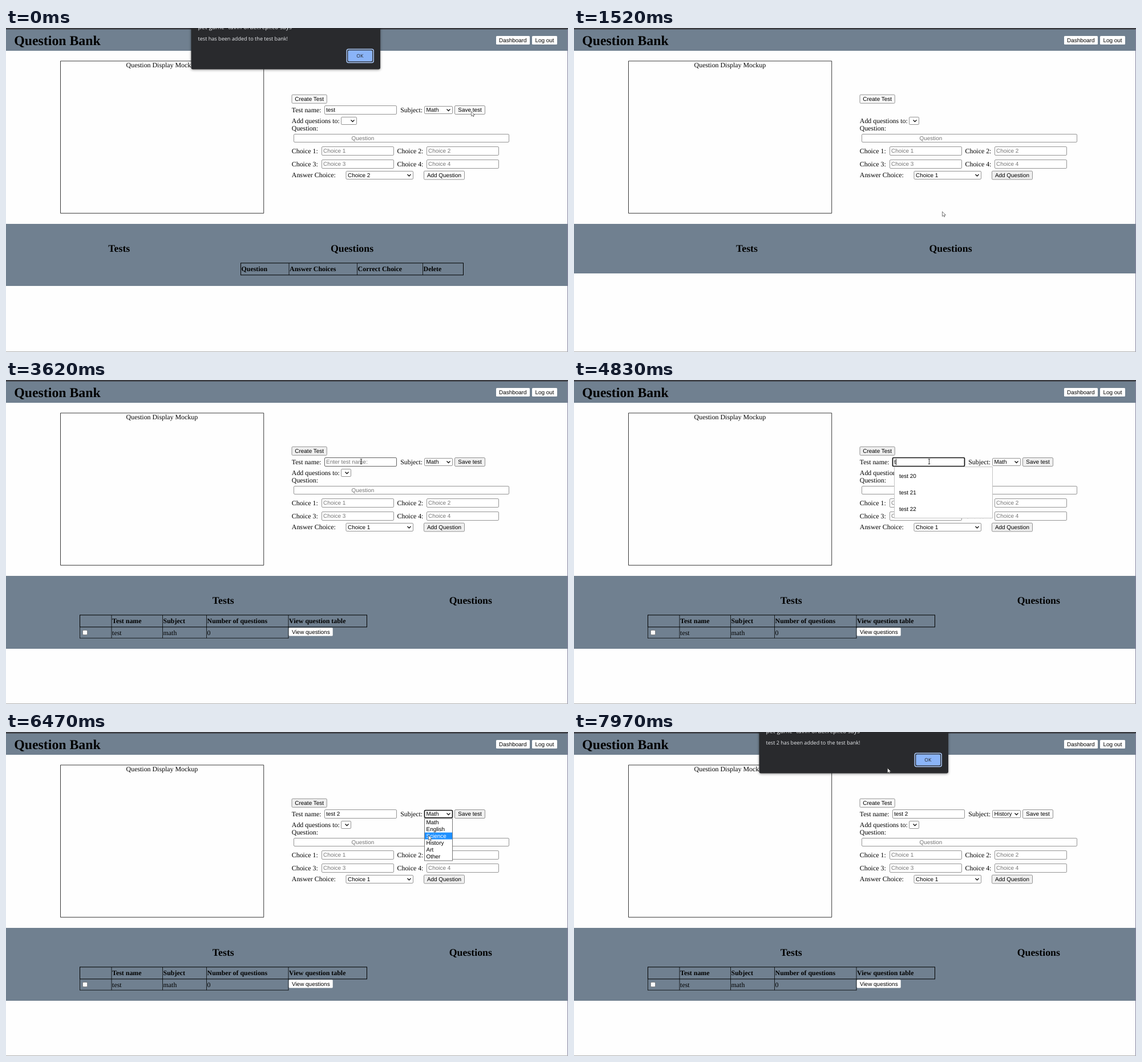
An HTML page that plays this animation: 985x569 px, repeating every 8000 ms.

```html
<!DOCTYPE html>
<html lang="en">
<head>
<meta charset="utf-8">
<title>Question Bank</title>
<style>
  html, body { margin: 0; width: 100%; height: 100%; overflow: hidden; background: #fefefe; }
  svg { display: block; width: 985px; height: 569px; }
  text {
    white-space: pre; text-rendering: geometricPrecision;
    font: 11.9px "Liberation Serif", "Times New Roman", serif;
  }
  .bold { font-weight: bold; }
  .h1 { font-size: 23.8px; font-weight: bold; }
  .h2 { font-size: 17.8px; font-weight: bold; }
  .ui { font: 9.95px "Liberation Sans", Arial, sans-serif; }
  .hint { fill: #757575; }
  .mid { text-anchor: middle; }
  .msg { font: 9.1px "Open Sans", "Noto Sans", sans-serif; fill: #e8eaed; }
  .msgTitle { font-size: 10.4px; }
  .ok { font-size: 8.6px; fill: #202124; }
  .dialog { filter: drop-shadow(0 1px 2px rgba(0, 0, 0, .45)); }
</style>
</head>
<body>
<svg id="stage" viewBox="0 0 985 569" xmlns="http://www.w3.org/2000/svg"></svg>
<script>
const LOOP = 8000;
const AT = {
  closeStart: 900, closeEnd: 1095, reload: 1250, loaded: 1700, repaint: 2700,
  create: 3150, focus: 3790, typing: 4770, suggestEnd: 5640,
  openList: 6110, pick: 7040, press: 7420, alert: 7570
};
const NEW_NAME = 'test 2';
const SUBJECTS = ['Math', 'English', 'Science', 'History', 'Art', 'Other'];
const SUGGESTIONS = ['test 20', 'test 21', 'test 22', 'quiz', 'sample'];
const HAIR = .78;

// time, x, y of the pointer tip
const PATH = [
  [0, 815, 146], [150, 815, 146], [590, 628, 53], [740, 628, 53], [860, 621, 54],
  [1090, 621, 54], [1520, 645, 322], [1580, 645, 322], [1960, 662, 380], [2390, 640, 309],
  [2980, 530, 122], [3150, 530, 122], [3600, 622, 143], [5630, 622, 143], [5860, 734, 146],
  [6110, 738, 147], [6410, 739, 178], [6470, 740, 181], [6720, 740, 181], [6860, 741, 191],
  [7040, 741, 191], [7220, 806, 147], [7570, 806, 147], [7960, 549, 63], [LOOP, 549, 63]
];

const stage = document.getElementById('stage');
const meter = document.createElement('canvas').getContext('2d');
meter.font = '9.95px "Liberation Sans", Arial, sans-serif';

const within = (t, from, to) => t >= from && t < to;
const clamp = v => Math.max(0, Math.min(1, v));
const rect = (x, y, w, h, fill, extra = '') =>
  `<rect x="${x}" y="${y}" width="${w}" height="${h}" fill="${fill}" ${extra}/>`;
const text = (x, y, s, cls = '') => `<text x="${x}" y="${y}" class="${cls}">${s}</text>`;
const line = d => `<path d="${d}" fill="none" stroke="#000" stroke-width="${HAIR}"/>`;
const box = (x, y, w, h, fill = '#fff', stroke = '#767676', width = HAIR) =>
  rect(x + .5, y + .5, w - 1, h - 1, fill, `rx="1.6" stroke="${stroke}" stroke-width="${width}"`);

function pointerAt(t) {
  const i = Math.max(1, PATH.findIndex(p => p[0] > t));
  const [t0, x0, y0] = PATH[i - 1], [t1, x1, y1] = PATH[i];
  const u = clamp((t - t0) / (t1 - t0)), k = u * u * (3 - 2 * u);
  return { x: x0 + (x1 - x0) * k, y: y0 + (y1 - y0) * k };
}

const inside = (p, x, y, w, h) => p.x >= x && p.x <= x + w && p.y >= y && p.y <= y + h;

function button(x, y, w, h, label, fill) {
  return box(x, y, w, h, fill) + text(x + w / 2, y + h / 2 + 3.4, label, 'ui mid');
}

function select(x, y, w, h, label, focused) {
  const cx = x + w - 7.5, cy = y + h / 2;
  return box(x, y, w, h, '#fff', focused ? '#101010' : '#767676', focused ? 1.6 : HAIR) +
    text(x + 3.5, cy + 3.4, label, 'ui') +
    `<path d="M${cx - 3} ${cy - 1.5}l3 3l3-3" fill="none" stroke="#111" stroke-width="1.3"/>`;
}

function pageFrame() {
  return rect(0, 0, 985, 569, '#fefefe') + rect(0, 0, 984, 40, '#708090') +
    rect(0, 0, 985, 2.5, '#393a40') + text(14.3, 30, 'Question Bank', 'h1') +
    rect(859, 14, 59, 15, '#fff', 'rx="1.5"') + text(888.3, 25, 'Dashboard', 'ui mid') +
    rect(922, 14, 44, 15, '#fff', 'rx="1.5"') + text(944, 25, 'Log out', 'ui mid') +
    line('M95.5 58H451.7V325.3H95.5Z') + text(210.6, 69, 'Question Display Mockup');
}

function form(t, p, blocked) {
  const old = t < AT.reload;
  const listOpen = within(t, AT.openList, AT.pick);
  const free = !blocked && !listOpen;
  const plain = old ? '#fbfbfb' : '#efefef';
  const quiet = t < AT.repaint || t >= AT.alert ? '#f8f8f8' : plain;
  const tone = (fill, ...area) => free && !old && inside(p, ...area) ? '#e5e5e5' : fill;
  let beam = false;

  const input = (x, y, w, h, value, hint, tx = x + 3, focused = false) => {
    const over = free && inside(p, x, y, w, h);
    beam = beam || over;
    return box(x, y, w, h, '#fff', focused ? '#101010' : over ? '#333' : '#767676', focused ? 1.7 : HAIR) +
      text(tx, y + h / 2 + 3.4, value || hint, value ? 'ui' : 'ui hint');
  };

  let out = button(500.5, 116.7, 62.3, 16, 'Create Test', tone(quiet, 501, 117, 62, 16));

  if (old || t >= AT.create) {
    const count = t < AT.typing ? 0 : Math.floor((t - AT.typing) / 92) + 1;
    const value = old ? 'test' : NEW_NAME.slice(0, count);
    const focused = within(t, AT.focus, AT.openList);
    const saveFill = within(t, AT.press, AT.alert) ? '#f5f5f5' : tone(quiet, 786, 136, 54, 16);
    out += text(500.8, 148, 'Test name:') +
      input(558, 136, 127, 16, value, 'Enter test name:', 561, focused) +
      text(691.2, 148, 'Subject:') +
      select(733, 137, 50, 14, !old && t >= AT.pick ? 'History' : 'Math', within(t, AT.openList, AT.press)) +
      button(786, 136, 54, 16, 'Save test', saveFill);
    if (within(t, AT.focus, 4330) || within(t, AT.typing, 5730)) {
      out += rect(561.3 + meter.measureText(value).width, 138.5, .9, 11, '#000');
    }
  }

  out += text(500.8, 166.5, 'Add questions to:') +
    (t < AT.closeStart ? select(587, 156, 28, 14, '')
      : old ? select(587, 156, 34, 14, 'test') : select(587, 156, 18, 14, '')) +
    text(500.8, 179.8, 'Question:') + input(504, 186, 378, 15, '', 'Question', 605.5);

  for (let i = 0; i < 4; i++) {
    const right = i % 2, y = i < 2 ? 208 : 231;
    out += text(right ? 685.5 : 500.8, y + 11.5, `Choice ${i + 1}:`) +
      input(right ? 737 : 553, y, 127, 16, '', `Choice ${i + 1}`);
  }

  out += text(500.8, 261.5, 'Answer Choice:') +
    select(595.5, 251, 118.5, 15, old ? 'Choice 2' : 'Choice 1') +
    button(732, 250.7, 72, 15.8, 'Add Question', tone(plain, 732, 251, 72, 15));

  return { out, beam };
}

function headerRow(cols, labels) {
  const [first, last] = [cols[0], cols[cols.length - 1]];
  return rect(first + .5, 412.8, last - first, 21, 'none', 'stroke="#000"') +
    line(cols.slice(1, -1).map(x => `M${x + .5} 413V434`).join('')) +
    labels.map((s, i) => text(cols[i] + 1.6, 427, s, 'bold')).join('');
}

function questionsTable(x) {
  return headerRow([0, 84.5, 204, 319, 390].map(c => c + x),
    ['Question', 'Answer Choices', 'Correct Choice', 'Delete']);
}

function testsTable(x) {
  const cols = [0, 55.5, 145, 222, 365.5, 503].map(c => c + x);
  return headerRow(cols, ['', 'Test name', 'Subject', 'Number of questions', 'View question table']) +
    line(cols.slice(0, 5).map(c => `M${c + .5} 434V453.3`).join('') + `M${x} 453.3H${cols[4] + 1}`) +
    box(x + 5, 439, 9, 9) +
    ['', 'test', 'math', '0'].map((s, i) => text(cols[i] + 1.6, 447.5, s)).join('') +
    rect(x + 366.7, 435, 77, 14.5, '#fff', 'rx="1.5"') + text(x + 405.3, 445.7, 'View questions', 'ui mid');
}

function tables(t) {
  let bottom = 472, tests = 380.8, questions = 814.3, content;
  if (t < AT.closeStart) {
    [bottom, tests, questions] = [453, 198.3, 606.5];
    content = questionsTable(411);
  } else if (t < AT.reload) {
    [tests, questions] = [275.8, 761.5];
    content = testsTable(24) + questionsTable(566.5);
  } else if (t < AT.loaded) {
    [bottom, tests, questions] = [431, 303, 660];
    content = '';
  } else {
    content = testsTable(129);
  }
  return rect(0, 344, 984, bottom - 344, '#708090') +
    text(tests, 393, 'Tests', 'h2 mid') + text(questions, 393, 'Questions', 'h2 mid') + content;
}

function suggestions(t) {
  if (!within(t, AT.focus, AT.suggestEnd)) return '';
  const rows = t < AT.typing ? SUGGESTIONS : SUGGESTIONS.slice(0, 3);
  return rect(561.5, 152.5, 172, rows.length * 29 + 3, '#fff', 'stroke="#c4c4c4"') +
    rows.map((s, i) => text(570, 172 + i * 29, s, 'ui')).join('');
}

function subjectList(t, p) {
  if (!within(t, AT.openList, AT.pick)) return '';
  const active = Math.max(0, Math.min(5, Math.floor((p.y - 152.5) / 12)));
  return rect(733.5, 152, 49, 74, '#fff', 'stroke="#767676"') +
    rect(734, 152.5 + active * 12, 48, 12, '#1e90ff') +
    SUBJECTS.map((s, i) =>
      `<text x="736.5" y="${162 + i * 12}" class="ui" fill="${i === active ? '#fff' : '#000'}">${s}</text>`).join('');
}

function dialog(t) {
  const opening = t >= AT.alert;
  const shown = opening ? clamp((t - AT.alert) / 150)
    : 1 - clamp((t - AT.closeStart) / (AT.closeEnd - AT.closeStart));
  if (!shown) return '';
  const name = opening ? NEW_NAME : 'test';
  // the focus ring leaves as soon as the dialog starts to close
  const ring = opening || shown === 1 ? '#a9c7f7' : 'none';
  return `<g class="dialog" opacity="${shown}" transform="translate(0 ${-13 * (1 - shown)})">` +
    rect(324.5, -20, 331.5, 92.5, '#292a2d', 'rx="3"') +
    text(336.5, 2.2, 'pet-game--tavin-oruel.repl.co says', 'msg msgTitle') +
    text(336.5, 21.8, `${name} has been added to the test bank!`, 'msg') +
    rect(597.2, 37.2, 47, 23.6, ring === 'none' ? '#8ab4f8' : '#292a2d', `rx="3" stroke="${ring}" stroke-width="1.5"`) +
    rect(599.3, 39.3, 42.8, 19.4, '#8ab4f8', 'rx="2"') +
    text(620.3, 52.2, 'OK', 'msg ok mid') + '</g>';
}

function pointer(p, beam) {
  const shape = beam
    ? '<path d="M-1.8-4.5H1.8M0-4.5V4M-1.8 4H1.8" fill="none" stroke="#222" stroke-width=".9"/>'
    : '<path d="M0 0V8.3L2 6.5L3.3 9.3L4.6 8.7L3.3 6H6Z" fill="#fff" stroke="#444" stroke-width=".7"/>';
  return `<g transform="translate(${p.x + .5} ${p.y + .5})">${shape}</g>`;
}

function render(t) {
  const p = pointerAt(t);
  const blocked = t < AT.closeEnd || t >= AT.alert;
  const { out, beam } = form(t, p, blocked);
  stage.innerHTML = pageFrame() + out + tables(t) + suggestions(t) + subjectList(t, p) +
    rect(984, 2, 1, 567, '#85849f') + rect(0, 568, 985, 1, '#b0b0b0') +
    dialog(t) + pointer(p, beam);
}

const start = performance.now();
function tick() {
  render((performance.now() - start) % LOOP);
  requestAnimationFrame(tick);
}
tick();
</script>
</body>
</html>
```
